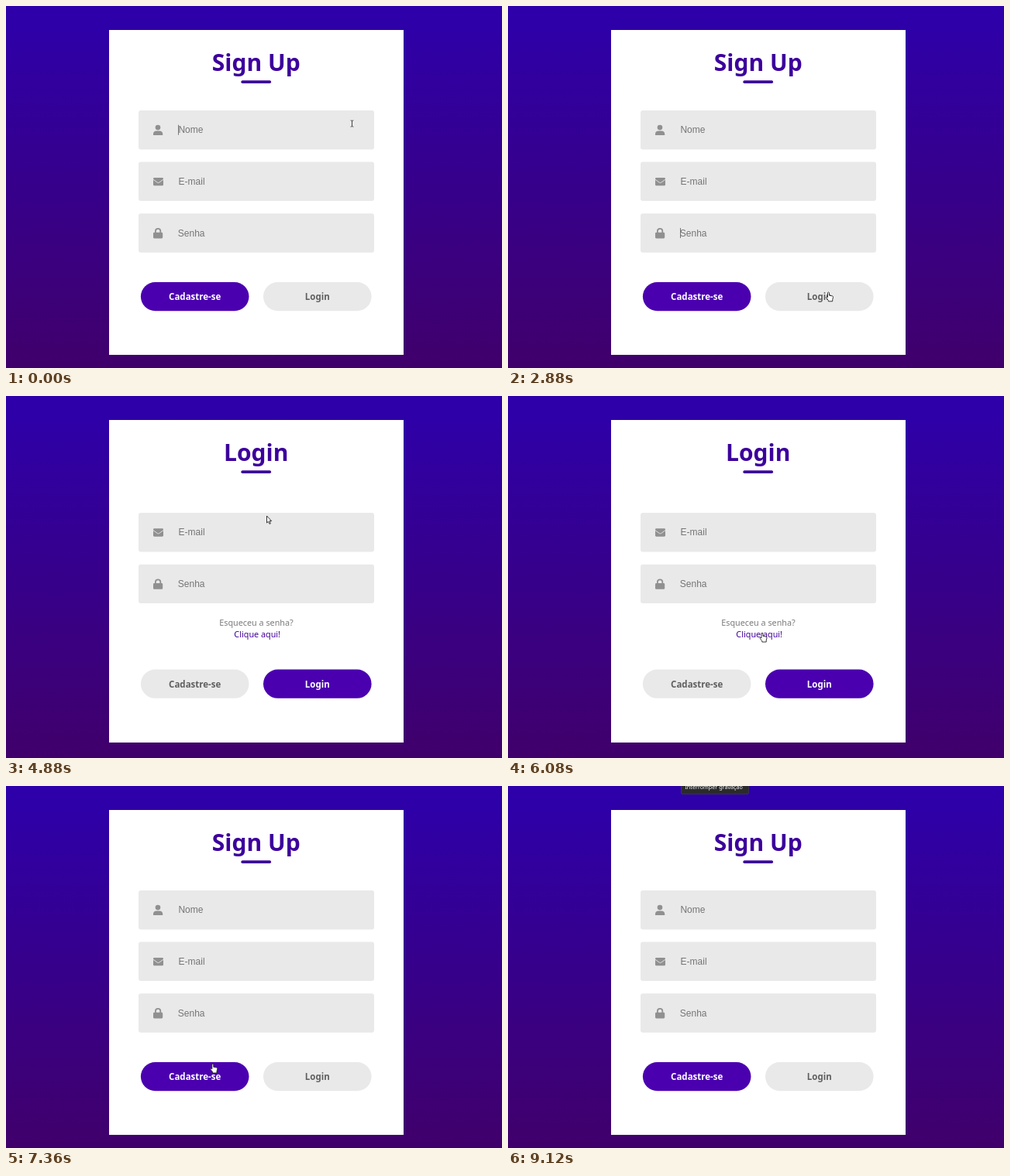
Animation of 640x468 px, one loop 9680 ms. Source, as an HTML page:

```html
<!DOCTYPE html>
<html lang="pt-BR">
<head>
<meta charset="utf-8">
<title>Sign Up</title>
<style>
  html, body { margin: 0; width: 100%; height: 100%; overflow: hidden; background: #2d00ab; }
  svg { display: block; width: 640px; height: 468px; }
  text { font-family: "Noto Sans", sans-serif; text-anchor: middle; }
  .title { font-size: 30px; font-weight: 700; fill: #3c009c; }
  .hint { font: 12px "Liberation Sans", Arial, sans-serif; text-anchor: start; fill: #757575; }
  .label { font-size: 11.5px; font-weight: 700; }
  .note { font-size: 10.8px; fill: #7a7a7a; }
  .link { fill: #42009a; }
  .tip { font-size: 7.2px; fill: #f4f4f4; }
  .field { fill: #e9e9e9; }
  .icon { fill: #909090; }
  .pointer { fill: #fff; stroke: #222; stroke-width: .9; stroke-linejoin: round; }
</style>
</head>
<body>
<svg viewBox="0 0 640 468">
  <defs>
    <linearGradient id="sky" x2="0" y2="1">
      <stop stop-color="#2d00ab"/>
      <stop offset="1" stop-color="#40006b"/>
    </linearGradient>
    <g id="user" class="icon">
      <circle cx="6" cy="3.2" r="3.3"/>
      <path d="M0 13V11.6C0 9.2 1.8 7.7 4 7.7H8.2C10.4 7.7 12.2 9.2 12.2 11.6V13Z"/>
    </g>
    <g id="mail" class="icon">
      <rect y="1.4" width="13" height="10.4" rx="1.4"/>
      <path d="M0 3.8 5.4 7.7Q6.5 8.4 7.6 7.7L13 3.8" fill="none" stroke="#e9e9e9" stroke-width=".9"/>
    </g>
    <g id="lock" class="icon">
      <rect y="5.5" width="12.2" height="7.7" rx="1.3"/>
      <path d="M2.9 6V3.7a3.2 3 0 0 1 6.4 0V6" fill="none" stroke="#909090" stroke-width="1.8"/>
    </g>
  </defs>
  <rect width="640" height="468" fill="url(#sky)"/>
  <rect id="card" x="133" y="31" width="380" fill="#fff"/>
  <text id="title" class="title" x="322.7" y="83.7"></text>
  <rect x="303.3" y="96.3" width="38.8" height="3.8" rx="1.8" fill="#3c009c"/>
  <g id="fields"></g>
  <g id="forgot">
    <text class="note" x="323" y="297.2">Esqueceu a senha?</text>
    <text class="note link" x="324.2" y="312.2">Clique aqui!</text>
  </g>
  <g id="buttons"></g>
  <rect id="caret" x="222" width="1" height="13" fill="#777"/>
  <g id="tip">
    <rect x="223.5" y="-8" width="87" height="18.4" rx="1.5" fill="#2b2b2b" stroke="#3d3d45" stroke-width=".8"/>
    <text class="tip" x="265.7" y="3.6">Interromper gravação</text>
  </g>
  <g id="cursor">
    <path id="beam" d="M-1.8-4H-.5L0-3.5.5-4H1.8M0-3.5V3.5M-1.8 4H-.5L0 3.5.5 4H1.8" fill="none" stroke="#333" stroke-width=".9"/>
    <path id="arrow" class="pointer" d="M0 0V9L2 7.2 3.5 10.4 4.9 9.8 3.5 6.6H6.2Z"/>
    <path id="hand" class="pointer" d="M-1 .9Q0-.6 1 .9V4.3L5 5.1Q6.2 5.4 6 6.8L5.2 10V12H-.2V10.7L-2.8 7.4Q-3.3 6.2-2 6.1L-1 6.9Z"/>
  </g>
</svg>
<script>
const LOOP = 9680, TICK = 80;
const LOGIN_AT = 3040, SIGNUP_AT = 7360, TIP_AT = 9120;

// time, x, y, shape held until the next key
const path = [
  [0, 446.5, 152, "beam"],
  [240, 443, 160, "beam"],
  [1040, 400, 277, "beam"],
  [1280, 394.5, 290.5, "beam"],
  [1840, 394.5, 290.5, "beam"],
  [2160, 400, 326, "arrow"],
  [2400, 411, 362, "hand"],
  [2560, 413.5, 369.8, "hand"],
  [3920, 413.5, 369.8, "hand"],
  [4240, 398, 338, "arrow"],
  [4880, 336.5, 155, "arrow"],
  [5040, 334, 170, "arrow"],
  [5280, 328, 306, "hand"],
  [6320, 328, 306, "hand"],
  [6560, 310, 325, "arrow"],
  [6880, 277, 356, "hand"],
  [7120, 266.8, 359, "hand"],
  [7600, 266.8, 359, "hand"],
  [7760, 240, 392, "arrow"],
  [7920, 222, 404, "arrow"],
  [8160, 218, 372, "hand"],
  [8880, 218, 372, "hand"],
  [9040, 262, 110, "arrow"],
  [9120, 266, -20, "arrow"],
  [LOOP, 266, -20, "arrow"]
];

const get = id => document.getElementById(id);
const show = (id, on) => get(id).style.display = on ? "" : "none";
const within = (t, a, b) => t >= a && t < b;

function field(y, icon, hint, x) {
  return `<rect class="field" x="171" y="${y}" width="304" height="50.4" rx="3"/>
    <use href="#${icon}" x="190" y="${y + 18.9}"/>
    <text class="hint" x="${x}" y="${y + 29.2}">${hint}</text>`;
}

function button(x, y, label, active) {
  return `<rect x="${x}" y="${y}" width="139.6" height="37.2" rx="18.6" fill="${active ? "#4b00b0" : "#e9e9e9"}"/>
    <text class="label" x="${x + 69.8}" y="${y + 23.2}" fill="${active ? "#fff" : "#606060"}">${label}</text>`;
}

let mode;
function setMode(login) {
  if (mode === login) return;
  mode = login;
  const y = login ? 353.6 : 357;
  get("card").setAttribute("height", login ? 417 : 420);
  get("title").textContent = login ? "Login" : "Sign Up";
  get("fields").innerHTML = login
    ? field(151, "mail", "E-mail", 222.6) + field(217.7, "lock", "Senha", 221.8)
    : field(135, "user", "Nome", 222.4) + field(201.6, "mail", "E-mail", 222.6) + field(268.3, "lock", "Senha", 221.8);
  get("buttons").innerHTML = button(173.9, y, "Cadastre-se", !login) + button(332, y, "Login", login);
  show("forgot", login);
}

function setCursor(t) {
  const i = path.findIndex((key, n) => t >= key[0] && t < path[n + 1][0]);
  const [t0, x0, y0, shape] = path[i], [t1, x1, y1] = path[i + 1];
  const p = (t - t0) / (t1 - t0);
  const x = x0 + (x1 - x0) * p, y = y0 + (y1 - y0) * p;
  get("cursor").setAttribute("transform", `translate(${x} ${y})`);
  for (const id of ["beam", "arrow", "hand"]) show(id, id === shape);
  show("cursor", t < TIP_AT);
}

function setCaret(t) {
  const name = t < 240 || within(t, 760, 1280);
  const password = within(t, 1840, 2360) || within(t, 2880, LOGIN_AT);
  get("caret").setAttribute("y", name ? 153.7 : 287);
  show("caret", name || password);
}

function draw(now) {
  const t = Math.floor(now % LOOP / TICK) * TICK;
  setMode(within(t, LOGIN_AT, SIGNUP_AT));
  setCursor(t);
  setCaret(t);
  show("tip", t >= TIP_AT);
}

let start;
function frame(now) {
  start ??= now;
  draw(Math.max(0, now - start));
  requestAnimationFrame(frame);
}
draw(0);
requestAnimationFrame(frame);
</script>
</body>
</html>
```
